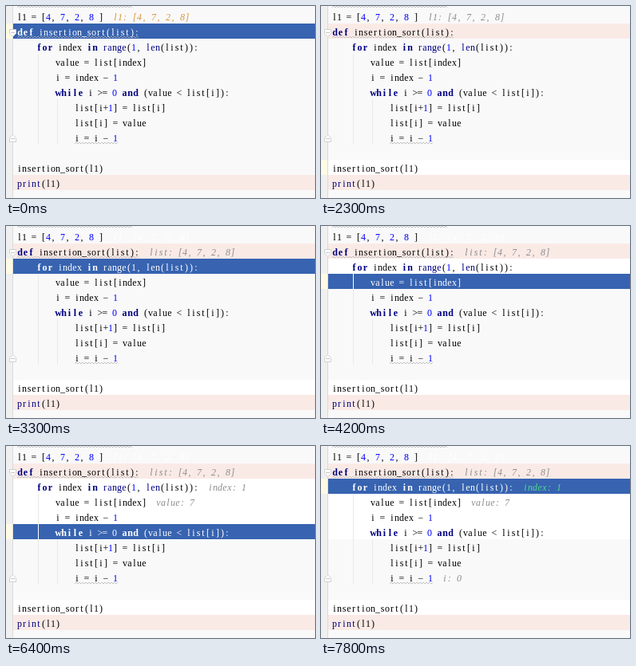
An HTML page with a canvas that plays this animation: 387x241 px, repeating every 8 s.

```html
<!DOCTYPE html>
<html>
<head>
<meta charset="utf-8">
<style>
html, body { margin: 0; width: 100%; height: 100%; overflow: hidden; background: #f9f9f9; }
canvas { display: block; }
</style>
</head>
<body>
<canvas id="stage" width="387" height="241"></canvas>
<script>
const ctx = document.getElementById('stage').getContext('2d');
const LOOP = 8000, ROW = 19, TOP = 3, GUTTER = 9, CELL = 6, BOLD_CELL = 7;
const FACE = '"Liberation Serif", "Noto Serif", serif';
const COLORS = {
  page: '#f9f9f9', gutter: '#f0f0f0', caret: '#fffae3', breakpoint: '#faeae6',
  current: '#3763b0', visited: '#ffffff', guide: '#e9e9e9',
  text: '#000000', keyword: '#000080', number: '#0000ff',
  fresh: '#d6943f', stale: '#8c8c8c', active: '#4fd98b', faded: '#ffffff'
};

const code = [
  'l1 = [4, 7, 2, 8 ]',
  'def insertion_sort(list):',
  '    for index in range(1, len(list)):',
  '        value = list[index]',
  '        i = index − 1',
  '        while i >= 0 and (value < list[i]):',
  '            list[i+1] = list[i]',
  '            list[i] = value',
  '            i = i − 1',
  '',
  'insertion_sort(l1)',
  'print(l1)'
];
const breakpoints = [1, 11];

// [start time, row]; null means no row is highlighted
const steps = [
  [0, 1], [1400, 10], [2300, null], [2400, 1], [3100, null], [3200, 2],
  [4200, 3], [5200, 4], [6400, 5], [7600, null], [7700, 2]
];

// Each look is [start time, value colour, name colour if different]
const hints = [
  { row: 0, name: 'l1:', value: ' [4, 7, 2, 8]',
    looks: [[0, 'fresh'], [1600, 'stale'], [2500, 'faded']] },
  { row: 1, name: 'list:', value: ' [4, 7, 2, 8]',
    looks: [[2600, 'fresh'], [3100, 'fresh', 'stale'], [3300, 'stale']] },
  { row: 2, name: 'index:', value: ' 1',
    looks: [[4300, 'fresh'], [5200, 'stale'], [7700, 'active']] },
  { row: 3, name: 'value:', value: ' 7',
    looks: [[5300, 'fresh'], [6400, 'stale']] },
  { row: 8, name: 'i:', value: ' 0',
    looks: [[6500, 'fresh'], [7600, 'stale']] }
];

const rowTop = row => TOP + row * ROW;
const until = (list, t) => list.filter(item => item[0] <= t);
const latest = (list, t) => until(list, t).pop();

function box(x, y, w, h, color) {
  ctx.fillStyle = color;
  ctx.fillRect(x, y, w, h);
}

const fillRow = (row, color) => box(GUTTER, rowTop(row), 387 - GUTTER, ROW, color);

// Writes on the editor's character grid and returns the end position
function write(text, x, row, color, style = '') {
  const cell = style === 'bold' ? BOLD_CELL : CELL;
  ctx.font = `${style} 12px ${FACE}`;
  ctx.fillStyle = color;
  for (const char of text) {
    ctx.fillText(char, x + cell / 2, rowTop(row) + 15);
    x += cell;
  }
  return x;
}

function writeCode(row, selected) {
  let x = 14;
  for (const token of code[row].match(/\w+|\W+/g) || []) {
    const keyword = /^(def|for|in|while|and)$/.test(token);
    const builtin = /^(range|len|print)$/.test(token);
    const number = /^\d+$/.test(token);
    const color = selected ? '#ffffff'
      : keyword || builtin ? COLORS.keyword
      : number ? COLORS.number : COLORS.text;
    x = write(token, x, row, color, keyword ? 'bold' : '');
  }
  return x;
}

function squiggle(from, to, y) {
  ctx.strokeStyle = '#b5b5b5';
  ctx.lineWidth = 0.8;
  ctx.beginPath();
  for (let x = from, i = 0; x <= to; x += 2, i++) ctx.lineTo(x, y + (i % 2 ? -1 : 1));
  ctx.stroke();
}

function indentGuide(x, firstRow, lastRow, current) {
  for (let row = firstRow; row <= lastRow; row++) {
    box(x, rowTop(row), 1, ROW, row === current ? '#ffffff' : COLORS.guide);
  }
}

// Fold handle: a small tag pointing down (1) or up (-1)
function foldHandle(y, direction) {
  ctx.beginPath();
  [[-4, -4], [4, -4], [4, 1], [0, 5], [-4, 1]]
    .forEach(([dx, dy]) => ctx.lineTo(8.5 + dx, y + dy * direction));
  ctx.closePath();
  ctx.fillStyle = '#ffffff';
  ctx.strokeStyle = '#d0d0d0';
  ctx.lineWidth = 1;
  ctx.fill();
  ctx.stroke();
  box(6, y - 0.5, 5, 1, '#c4c4c4');
}

function draw(t) {
  const current = latest(steps, t)[1];
  const visited = until(steps, t).map(step => step[1]).filter(row => row !== null);

  box(0, 0, 387, 241, COLORS.page);
  box(0, 0, GUTTER, 241, COLORS.gutter);
  box(0, rowTop(visited[visited.length - 1]), GUTTER, ROW, COLORS.caret);
  visited.forEach(row => fillRow(row, COLORS.visited));
  breakpoints.forEach(row => fillRow(row, COLORS.breakpoint));
  box(8, 0, 1, 241, '#d9d9d9');
  if (current !== null) fillRow(current, COLORS.current);

  indentGuide(40, 3, 8, current);
  indentGuide(64, 6, 8, current);
  squiggle(14, 158, 1);
  squiggle(14, 166, 39);
  squiggle(86, 140, 172);
  foldHandle(33.5, 1);
  foldHandle(166.5, -1);

  ctx.textAlign = 'center';
  const ends = code.map((_, row) => writeCode(row, row === current));
  for (const { row, name, value, looks } of hints) {
    const look = latest(looks, t);
    if (!look) continue;
    const [, valueColor, nameColor = valueColor] = look;
    const x = write(name, ends[row] + 2 * CELL, row, COLORS[nameColor], 'italic');
    write(value, x, row, COLORS[valueColor], 'italic');
  }
}

const start = performance.now();
function tick() {
  draw((performance.now() - start) % LOOP);
  requestAnimationFrame(tick);
}
tick();
</script>
</body>
</html>
```
